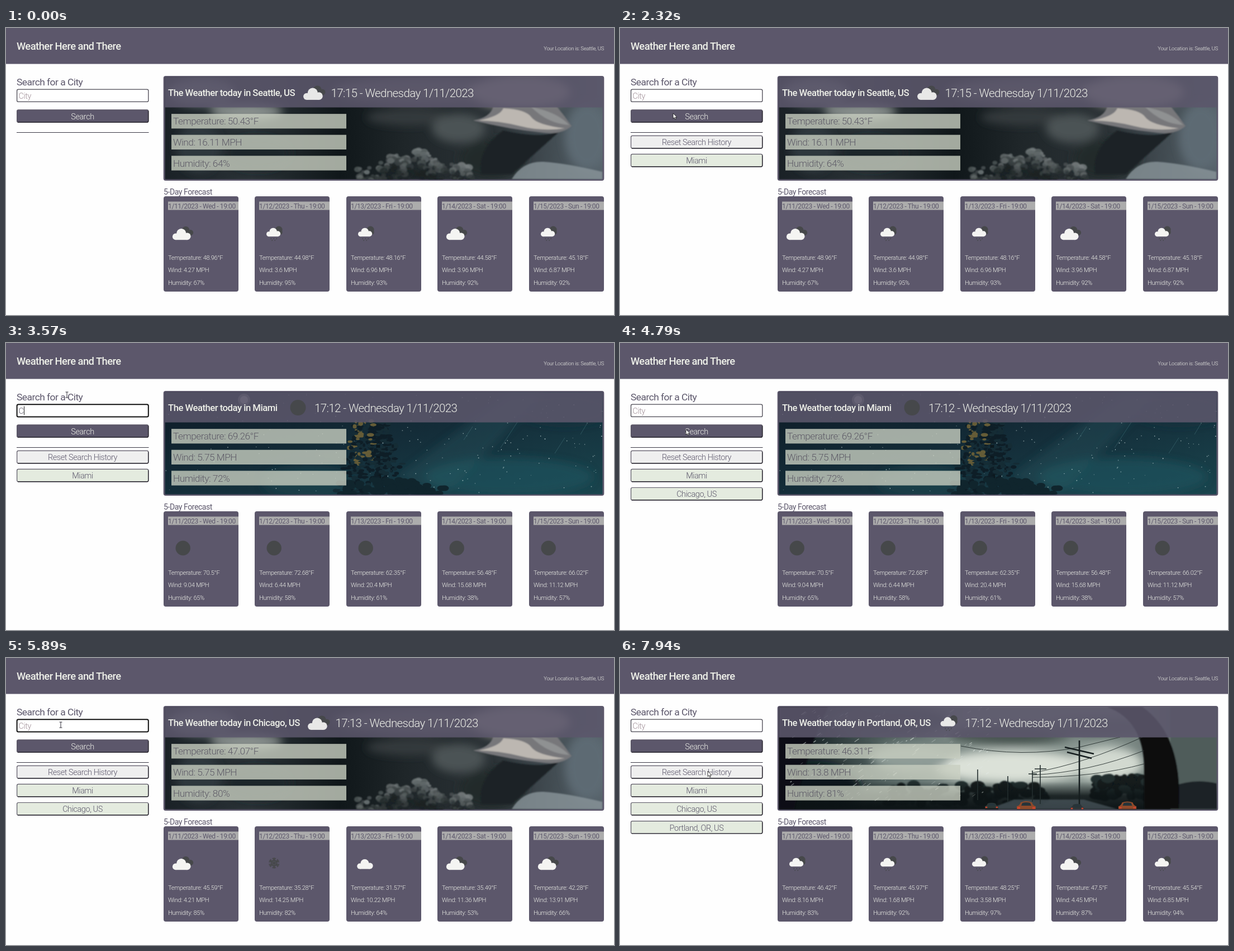
Recreate the animation shown at these times as an HTML page. Size 1088 by 515 pixels, loop 8 s.

```html
<!DOCTYPE html>
<html lang="en">
<head>
<meta charset="utf-8">
<title>Weather Here and There</title>
<style>
  html, body { margin: 0; width: 100%; height: 100%; overflow: hidden; background: #fefefe; }
  svg { display: block; width: 100vw; height: 100vh; }
  text { font-family: Roboto, "Liberation Sans", sans-serif; font-weight: 300; letter-spacing: -.03em; white-space: pre; }
</style>
</head>
<body>
<svg id="stage" viewBox="0 0 1088 515">
  <defs>
    <clipPath id="photo"><rect x="284.5" y="88.5" width="783" height="183"/></clipPath>
    <filter id="soft" x="-30%" y="-30%" width="160%" height="160%"><feGaussianBlur stdDeviation="8"/></filter>
    <filter id="fine"><feGaussianBlur stdDeviation="1"/></filter>
    <linearGradient id="stormSky">
      <stop stop-color="#1a2126"/><stop offset=".2" stop-color="#2a3236"/><stop offset=".4" stop-color="#10171a"/>
      <stop offset=".55" stop-color="#1f2629"/><stop offset=".75" stop-color="#2b3236"/><stop offset="1" stop-color="#56626a"/>
    </linearGradient>
    <linearGradient id="nightSky" x2="1" y2="1">
      <stop stop-color="#0d1a25"/><stop offset=".5" stop-color="#142d39"/><stop offset="1" stop-color="#1a454e"/>
    </linearGradient>
    <linearGradient id="rainSky">
      <stop stop-color="#0c1315"/><stop offset=".1" stop-color="#243032"/><stop offset=".25" stop-color="#566563"/>
      <stop offset=".45" stop-color="#87948f"/><stop offset=".75" stop-color="#87948f"/><stop offset="1" stop-color="#4c5858"/>
    </linearGradient>
    <linearGradient id="road" x2="0" y2="1">
      <stop stop-color="#0c1315" stop-opacity="0"/><stop offset=".5" stop-color="#0c1315" stop-opacity=".85"/><stop offset="1" stop-color="#0c1315"/>
    </linearGradient>
  </defs>
  <g id="frame"></g>
  <g id="scenes" clip-path="url(#photo)"></g>
  <g id="hero"></g>
  <g id="forecast"></g>
  <g id="side"></g>
  <g id="cursor"></g>
</svg>
<script>
const LOOP = 8000, PURPLE = '#5c576b', PALE = '#eef0e9';
const $ = id => document.getElementById(id);

// y is the middle of the capitals
const text = (x, y, size, str, fill = PALE, extra = '') =>
  `<text x="${x}" y="${y + size * .355}" font-size="${size}" fill="${fill}" ${extra}>${str}</text>`;
const rect = (x, y, w, h, fill, extra = '') =>
  `<rect x="${x}" y="${y}" width="${w}" height="${h}" fill="${fill}" ${extra}/>`;
const blob = (x, y, rx, ry, fill, alpha = 1) =>
  `<ellipse cx="${x}" cy="${y}" rx="${rx}" ry="${ry}" fill="${fill}" opacity="${alpha}"/>`;
const path = (d, fill, extra = '') => `<path d="${d}" fill="${fill}" ${extra}/>`;
const line = (d, color, width, extra = '') => path(d, 'none', `stroke="${color}" stroke-width="${width}" ${extra}`);
const blur = (id, body) => `<g filter="url(#${id})">${body}</g>`;
const many = (n, make) => Array.from({ length: n }, (_, i) => make(i)).join('');
const place = (body, x, y, k = 1) => `<g transform="translate(${x} ${y}) scale(${k})">${body}</g>`;

function random(seed) {
  return () => {
    seed = (seed * 1664525 + 1013904223) >>> 0;
    return seed / 4294967296;
  };
}

// ---- icons, centred on 0,0 ----
const puff = fill => `<g fill="${fill}"><circle cx="-12" cy="6.4" r="5.8"/><circle cx="-2" cy=".6" r="8.6"/>
  <circle cx="8.5" cy="5.8" r="6.4"/><rect x="-12" y="4" width="20.5" height="8.2"/></g>`;
const DARK = '#46484a', WHITE = '#f4f4f2';
const icons = {
  cloud: place(puff(DARK), 6.5, -5.5, .8) + place(puff(WHITE), -1, 0),
  plain: place(puff(WHITE), 0, 0, .87),
  rain: blob(8.5, -6, 6.4, 6.4, DARK) + blob(11, -1.5, 4, 4, DARK) +
    place(puff(WHITE), 0, -3.2, .77) + line('M-5 9l-1 2M0 9l-1 2M5 9l-1 2M-3 12l-1 2M2 12l-1 2', DARK, 1.2),
  moon: `<circle r="13.2" fill="${DARK}"/>`,
  snow: many(6, i => `<g transform="rotate(${i * 60})">${line('M0 0V-10M-3-9L0-6L3-9M-2.6-5.5L0-3L2.6-5.5', DARK, 1.7)}</g>`)
};

// ---- backdrops ----
function storm() {
  const r = random(7);
  const ridge = x => 252 - 24 * Math.exp(-(((x - 690) / 24) ** 2)) - 34 * Math.exp(-(((x - 742) / 30) ** 2))
    - 12 * Math.exp(-(((x - 800) / 20) ** 2));
  const bumps = Array.from({ length: 220 }, () => {
    const x = 628 + 205 * r();
    return { x, y: ridge(x) + 50 * r(), size: 3 + 5 * r(), tone: r() };
  }).sort((a, b) => a.y - b.y);
  return rect(284, 88, 784, 184, 'url(#stormSky)') +
    blur('soft', blob(430, 150, 65, 15, '#a3a9a6', .8) + blob(350, 115, 60, 25, '#6b7377') +
      blob(345, 215, 40, 45, '#2f383c') + blob(450, 225, 60, 30, '#1d2529') + blob(735, 112, 150, 22, '#585b5f') +
      blob(720, 160, 75, 14, '#353b3e') + blob(810, 180, 48, 26, '#4c5254') + blob(920, 115, 90, 30, '#aaa5a2') +
      blob(1040, 195, 40, 60, '#5d6a73') + blob(870, 235, 60, 36, '#22292c')) +
    blur('fine', path('M905 271Q925 238 962 240T1067 258V271Z', '#8a959a', 'opacity=".8"') +
      path('M890 184Q960 200 992 184Q950 222 905 262H850Q845 215 890 184Z', '#1b2225') +
      path('M836 166Q868 160 872 140H985Q1000 158 1012 176Q994 192 962 188Q900 182 836 166Z', '#77777a') +
      path('M846 166Q885 158 890 144Q930 146 940 160T1000 180Q960 186 920 176T846 166Z', '#bcb7b1') +
      path('M940 142Q985 150 1008 174Q970 172 940 142Z', '#8f9192') +
      bumps.map(b => {
        const v = Math.max(28, 140 - (b.y - ridge(b.x)) * 2.2 - b.tone * 65) | 0;
        return blob(b.x, b.y, b.size, b.size * .8, `rgb(${v},${v + 7},${v + 8})`, .8);
      }).join(''));
}

function night() {
  const r = random(21);
  const leaves = many(460, () => {
    const v = r(), x = 655 + (r() * 2 - 1) * (26 + 50 * v * (.7 + .3 * Math.sin(v * 22)));
    const gold = x < 658 && v < .65 && r() < .3;
    return blob(x, 130 + v * 138, 2 + 5 * r(), 1.5 + 2.5 * r(), gold ? '#655c37' : r() < .6 ? '#0e1e27' : '#152c35');
  });
  const bush = many(90, () => {
    const x = 590 + 200 * r();
    return blob(x, 242 + 30 * r() + Math.abs(x - 690) * .1, 8, 5, '#10252d');
  });
  const stars = many(210, () => blob(285 + 782 * r(), 90 + 180 * r(), .5 + .5 * r(), .5 + .5 * r(), '#dcecea', .3 + .6 * r()));
  return rect(284, 88, 784, 184, 'url(#nightSky)') +
    blur('soft', blob(900, 240, 150, 34, '#21565f', .6) + blob(540, 250, 80, 28, '#1a444e', .7) +
      blob(1000, 120, 80, 26, '#19303d') + path('M700 240L900 90H960L790 271Z', '#2b5e68', 'opacity=".3"')) +
    line('M835 150l-16 24M915 142l-30 46M1000 170l-18 28M1040 144l-12 20', '#5c8f95', .7, 'opacity=".5"') +
    stars + blob(426, 102, 11, 11, '#9ba3a8', .6) + blob(426, 102, 7, 7, '#cfd5d8', .8) +
    line('M668 150Q662 210 672 271', '#0c181e', 7) + leaves + bush;
}

function rain() {
  const r = random(5);
  const trees = (x, w, y) => many(90, () => blob(x + w * r(), y + 34 * r(), 5 + 8 * r(), 4 + 7 * r(), r() < .6 ? '#121a1c' : '#222e2f'));
  const car = (x, y, k, color) => place(
    path('M-17 10V0Q-12-1-10-7Q0-11 10-7Q12-1 17 0V10Z', color) + path('M-9-1L-7-6Q0-8 7-6L9-1Z', '#26343a') +
    rect(-16, 1, 5, 4, '#c8442d') + rect(11, 1, 5, 4, '#c8442d') + rect(-17, 5, 34, 6, '#171b1d'), x, y, k);
  const drops = many(190, () => {
    const len = 2 + 6 * r();
    return line(`M${300 + 360 * r()} ${92 + 165 * r()}l${len} ${-len * .7}`, '#e3eae6', .6 + r(), `opacity="${.2 + .5 * r()}"`);
  });
  return rect(284, 88, 784, 184, 'url(#rainSky)') +
    blur('soft', blob(700, 195, 140, 28, '#dbe1d8') + blob(870, 190, 65, 30, '#d2d9d0') +
      blob(520, 180, 70, 24, '#8f9c97') + blob(480, 112, 110, 24, '#3f4d4d') + blob(700, 138, 110, 18, '#46524f') +
      blob(850, 125, 90, 18, '#5f6c69') + blob(350, 235, 80, 45, '#11191b')) +
    blur('fine', trees(480, 285, 228) + trees(850, 95, 216)) +
    rect(284, 222, 784, 50, 'url(#road)') +
    blur('fine', path('M660 271L705 254H830L890 271Z', '#56646a', 'opacity=".6"') +
      path('M284 88H372Q340 150 312 271H284Z', '#0a1012') + rect(985, 88, 83, 184, '#4f5b5a') +
      path('M985 271V232Q1025 215 1068 225V271Z', '#1a2425') +
      path('M872 88Q938 112 938 200V271H1000Q1008 140 935 88Z', '#090e10')) +
    line('M738 206Q830 190 935 142M738 210Q840 205 938 166M738 214Q850 214 938 190M610 158Q720 180 822 160L895 142', '#27302f', .9) +
    line('M822 148V271M796 160L848 172M800 169L844 180', '#161e1f', 2.6) +
    line('M752 192V262M742 199H763M738 202V258M731 208H746M694 212V258M640 200V255', '#222c2d', 1.6) +
    car(727, 266, 1, '#8c4a2b') + car(908, 266, .95, '#8f4a2a') + car(818, 268, .7, '#2c3437') + car(665, 266, .7, '#2b3635') + drops;
}

const scenes = { storm, night, rain };
$('scenes').innerHTML = Object.keys(scenes).map(k => `<g id="${k}">${scenes[k]()}</g>`).join('');

// ---- data ----
const reports = [
  { city: 'Seattle, US', scene: 'storm', icon: 'cloud', x: 552, clock: '17:15', now: ['50.43', '16.11', '64'],
    days: 'cloud 48.96 4.27 67|rain 44.98 3.6 95|rain 48.16 6.96 93|cloud 44.58 3.96 92|rain 45.18 6.87 92' },
  { city: 'Miami', scene: 'night', icon: 'moon', x: 522.5, clock: '17:12', now: ['69.26', '5.75', '72'],
    days: 'moon 70.5 9.04 65|moon 72.68 6.44 58|moon 62.35 20.4 61|moon 56.48 15.68 38|moon 66.02 11.12 57' },
  { city: 'Chicago, US', scene: 'storm', icon: 'cloud', x: 560, clock: '17:13', now: ['47.07', '5.75', '80'],
    days: 'cloud 45.59 4.21 85|snow 35.28 14.25 82|plain 31.57 10.22 64|cloud 35.49 11.36 53|cloud 42.28 13.91 66' },
  { city: 'Portland, OR, US', scene: 'rain', icon: 'rain', x: 588, clock: '17:12', now: ['46.31', '13.8', '81'],
    days: 'rain 46.42 8.16 83|rain 45.97 1.68 92|rain 48.25 3.58 97|cloud 47.5 4.45 87|rain 45.54 6.85 94' }
];
const facts = ([t, w, h]) => [`Temperature: ${t}°F`, `Wind: ${w} MPH`, `Humidity: ${h}%`];

// ---- page parts ----
$('frame').innerHTML = rect(0, 0, 1088, 64.5, PURPLE) +
  text(19, 32, 18.4, 'Weather Here and There', PALE, 'style="font-weight:500"') +
  text(1070, 37, 9.5, 'Your Location is: Seattle, US', PALE, 'text-anchor="end"') +
  text(19, 96.5, 17.4, 'Search for a City', PURPLE, 'style="font-weight:400"') +
  rect(19, 187, 236.5, 1, '#3a3844') +
  rect(281.7, 86, 788.6, 188, PURPLE, 'rx="4"') +
  text(282, 294, 14, '5-Day Forecast', PURPLE, 'style="font-weight:400"');

function drawHero(report, icon) {
  const r = reports[report];
  for (const k in scenes) $(k).style.display = k === r.scene ? '' : 'none';
  $('hero').innerHTML = rect(284.5, 88.5, 783, 54, PURPLE, 'opacity=".88"') +
    text(290, 116.5, 16.7, `The Weather today in ${r.city}`, PALE, 'style="font-weight:500"') +
    `<g opacity=".93">${place(icons[icon], r.x, 116, 1.06)}</g>` +
    text(r.x + 29.5, 116.5, 20.6, `${r.clock} - Wednesday 1/11/2023`) +
    facts(r.now).map((s, i) => {
      const y = 167.3 + 37.6 * i;
      return rect(296, y - 13.2, 313, 26.3, '#c9cfc1', 'opacity=".8"') + text(299, y, 17.3, s, '#5d5a66');
    }).join('');
}

function drawForecast(report) {
  $('forecast').innerHTML = reports[report].days.split('|').map((day, i) => {
    const [icon, ...values] = day.split(' '), x = Math.round(281.6 + 163.6 * i);
    const name = ['Wed', 'Thu', 'Fri', 'Sat', 'Sun'][i];
    return rect(x, 302, 134, 171, PURPLE, 'rx="4"') + rect(x + 8, 311.5, 126, 15, '#acacac') +
      text(x + 8, 319.5, 12, `1/${11 + i}/2023 - ${name} - 19:00`, PURPLE, 'style="font-weight:400"') +
      place(icons[icon], x + 34.7, 368) +
      facts(values).map((s, j) => text(x + 8, 411.7 + 22.5 * j, 11.1, s)).join('');
  }).join('');
}

const button = (y, label, fill, color = PURPLE) =>
  rect(19.6, y, 235.2, 22.4, fill, 'rx="2.5" stroke="#5a5664" stroke-width="1.2"') +
  line(`M21 ${y + 22.4}H252.5Q254.8 ${y + 22.4} 254.8 ${y + 20}V${y + 2}`, '#1c1a22', 1.2) +
  text(137, y + 11.8, 14.5, label, color, 'text-anchor="middle"');

function drawSide(typed, focused, found) {
  const border = focused ? 'stroke="#111" stroke-width="2"' : 'stroke="#4a4852" stroke-width="1.3"';
  $('side').innerHTML = rect(19.6, 110.2, 235.2, 22.2, '#fff', `rx="2.5" ${border}`) +
    text(22.5, 121.5, 14.5, typed || 'City', typed ? '#5f5b69' : '#a08f97', 'id="entry"') +
    button(146.8, 'Search', PURPLE, PALE) +
    (found ? button(193.4, 'Reset Search History', '#efefef') : '') +
    many(found, i => button(226.4 + 33.1 * i, reports[i + 1].city, '#e4ebdf'));
  if (typed) {
    const x = 23 + $('entry').getComputedTextLength();
    $('side').innerHTML += rect(x, 113.5, 1, 15.5, '#222');
  }
}

// ---- timing ----
const count = (t, times) => times.filter(at => t >= at).length;
const searchAt = [1880, 4740, 7450];
const focusAt = [1000, 3000, 5600];
const typing = [
  { from: 1040, step: 90, str: 'Miami' },
  { from: 3560, step: 68, str: 'Chicago, US' },
  { from: 5960, step: 78, str: 'Portland, OR, US' }
];
const route = [
  [70, 813, 445], [210, 813, 445], [950, 89, 130], [1500, 89, 130], [1760, 95, 153], [2390, 95, 153],
  [2460, 96, 153], [2700, 96, 153], [3000, 101, 122], [3300, 109, 93], [4320, 109, 93], [4640, 118, 155],
  [5200, 118, 155], [5600, 98, 120], [7150, 98, 120], [7400, 118, 155], [7600, 118, 155], [7930, 157, 203], [LOOP, 157, 203]
];
const arrow = path('M0 0V9.6L2.2 7.6L3.8 11L5.4 10.3L3.9 7.1H6.9Z', '#fff', 'stroke="#111" stroke-width=".8"');
const beam = line('M-2.5-5H2.5M0-5V5M-2.5 5H2.5', '#33313a', 1);

function drawCursor(t) {
  const i = route.findIndex(p => t < p[0]);
  if (i < 1) { $('cursor').innerHTML = ''; return; }
  const [t0, x0, y0] = route[i - 1], [t1, x1, y1] = route[i];
  const u = (t - t0) / (t1 - t0), k = u * u * (3 - 2 * u);
  const x = x0 + (x1 - x0) * k, y = y0 + (y1 - y0) * k;
  $('cursor').innerHTML = place(x < 256 && y < 140 ? beam : arrow, x, y);
}

const shown = {};
function update(draw, ...args) {
  const key = args.join('/');
  if (shown[draw.name] === key) return;
  shown[draw.name] = key;
  draw(...args);
}

const start = performance.now();
function tick() {
  const t = Math.max(0, performance.now() - start) % LOOP;
  const report = count(t, [2390, 5010, 7650]), days = count(t, [2640, 5140, 7790]);
  const searches = count(t, searchAt), focused = count(t, focusAt) > searches;
  const entry = focused && typing[searches];
  const typed = entry ? entry.str.slice(0, Math.max(0, Math.floor((t - entry.from) / entry.step) + 1)) : '';
  const icon = report === 1 && days === 0 ? 'cloud' : reports[report].icon;
  update(drawHero, report, icon);
  update(drawForecast, days);
  update(drawSide, typed, focused, searches);
  drawCursor(t);
  requestAnimationFrame(tick);
}
tick();
</script>
</body>
</html>
```
